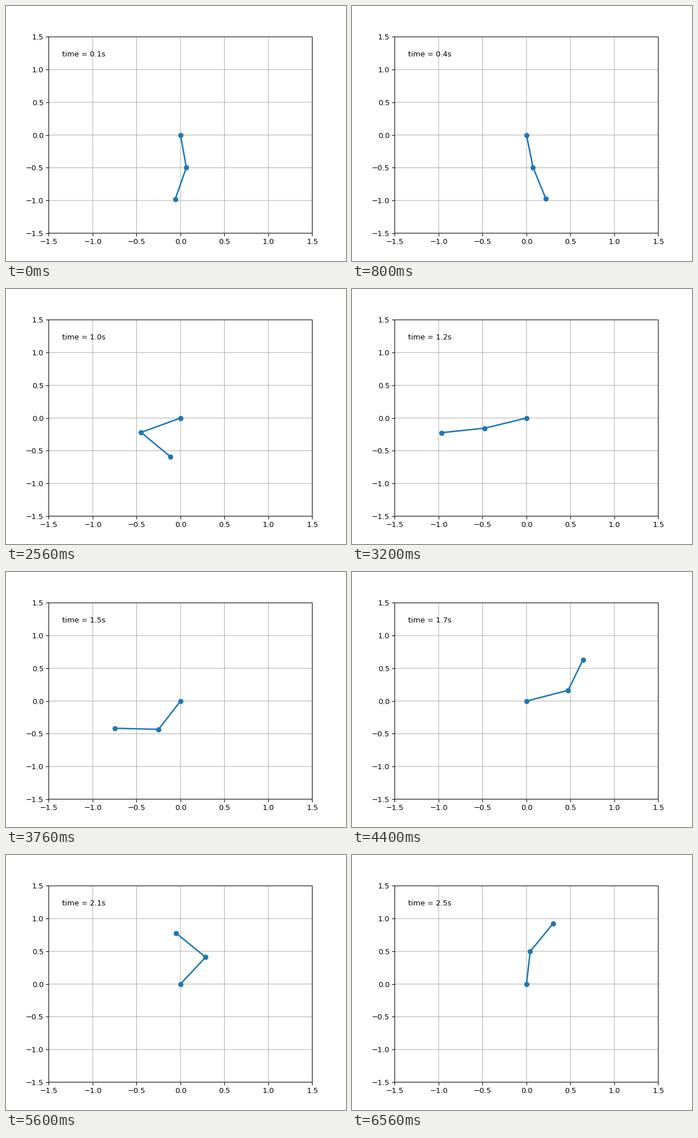
A matplotlib script for the animation above (6640 ms loop, 600 px wide and 450 px high).

```python
import numpy as np
import matplotlib.pyplot as plt
from matplotlib.animation import FuncAnimation

plt.rcParams["path.snap"] = False   # soft, unsnapped lines

FRAMES, INTERVAL = 83, 80
DT = 0.05      # simulated seconds per pose
LINK = 0.5     # length of each arm
HALF = 0.5     # half-pixel offset of the axes on a 640 x 480 grid

# key poses: time, upper angle, lower angle (degrees from straight down)
KEYS = np.array([
    (0.05, 7.6, -14.6), (0.25, -16, 51), (0.40, 20, -5), (0.65, 13, -98),
    (1.00, -64, 42), (1.25, -72, -82), (1.45, -30, -92), (1.50, 34, -80),
    (1.70, 109, 160), (1.85, 118, 192), (2.15, 145.2, 222.4),
    (2.50, 175.2, 148.5),
])
TIMES, ANGLES = KEYS[:, 0], KEYS[:, 1:]
SLOPES = np.gradient(ANGLES, TIMES, axis=0)


def angles_at(t):
    """Cubic Hermite interpolation of both joint angles, in radians."""
    i = int(np.clip(np.searchsorted(TIMES, t) - 1, 0, len(TIMES) - 2))
    h = TIMES[i + 1] - TIMES[i]
    s = (t - TIMES[i]) / h
    a, b = ANGLES[i], ANGLES[i + 1]
    va, vb = SLOPES[i] * h, SLOPES[i + 1] * h
    blend = s * s * (3 - 2 * s)
    bend = s * (1 - s) * ((1 - s) * va - s * vb)
    return np.radians(a + (b - a) * blend + bend)


def pose_index(frame):
    """Three poses are spread over every five frames."""
    return -(-3 * (frame - 1) // 5)


fig = plt.figure(figsize=(6.4, 4.8), dpi=93.75)
ax = fig.add_axes((0.125 + HALF / 640, 0.11 - HALF / 480, 0.775, 0.77),
                  xlim=(-1.5, 1.5), ylim=(-1.5, 1.5))
ticks = np.arange(-1.5, 1.6, 0.5)
ax.set_xticks(ticks)
ax.set_yticks(ticks)
ax.grid()
arm, = ax.plot([], [], "o-", lw=2)
label = ax.text(0.05, 0.9, "", transform=ax.transAxes)


def update(frame):
    t = (pose_index(frame) + 1) * DT
    theta = angles_at(t)
    x = np.concatenate(([0], np.cumsum(LINK * np.sin(theta))))
    y = np.concatenate(([0], np.cumsum(-LINK * np.cos(theta))))
    arm.set_data(x, y)
    label.set_text("time = %.1fs" % t)
    return arm, label


anim = FuncAnimation(fig, update, frames=FRAMES, interval=INTERVAL,
                     repeat=True, repeat_delay=0)
plt.show()
```
